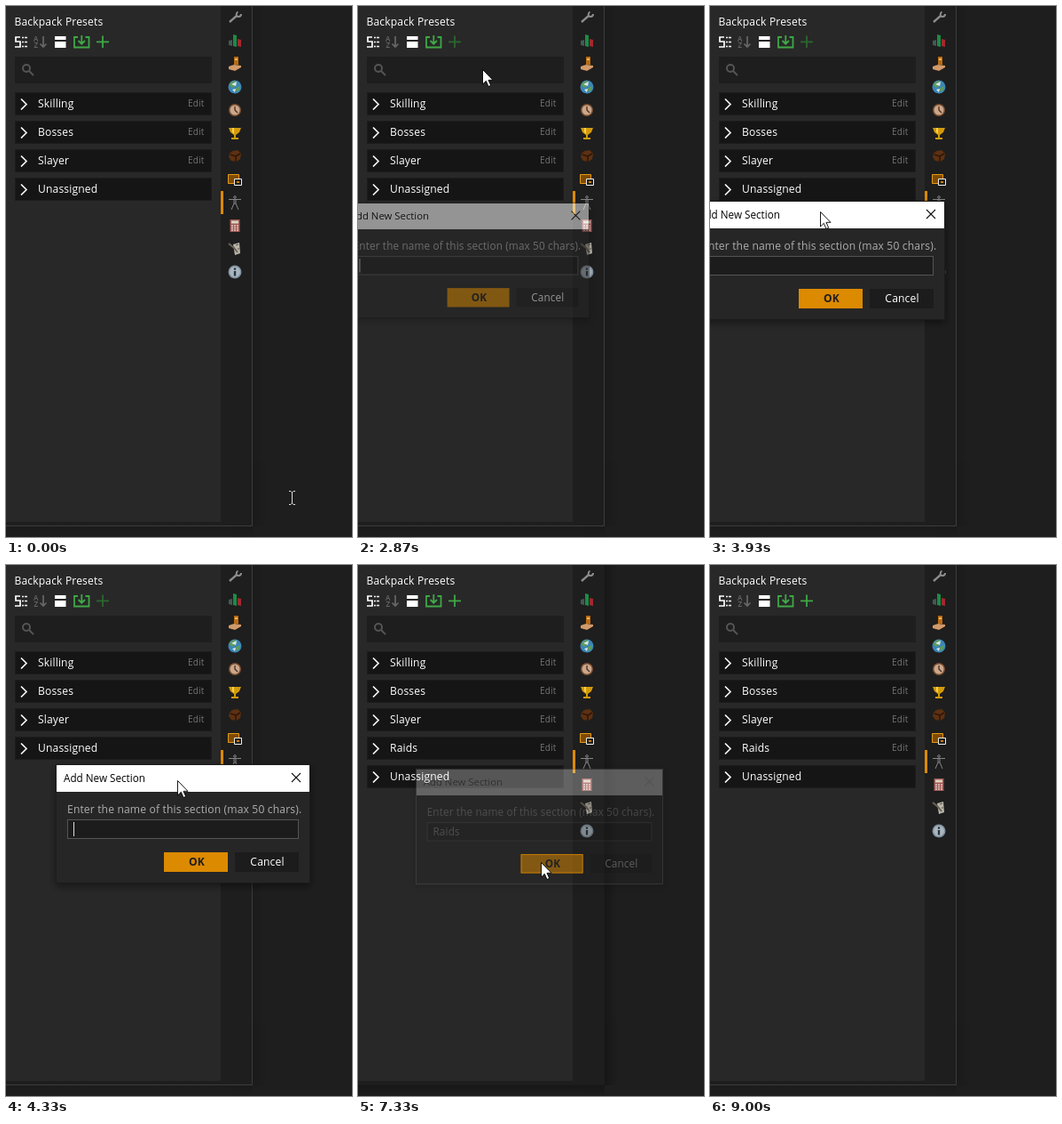
Recreate the animation shown at these times as an HTML page. Size 390 by 597 pixels, loop 9070 ms.

```html
<!DOCTYPE html>
<html lang="en">
<head>
<meta charset="utf-8">
<title>Add a section</title>
<style>
html, body { margin: 0; width: 100%; height: 100%; overflow: hidden; background: #1e1e1e; }
svg { display: block; width: 390px; height: 597px; }
text { font: 12.1px "Open Sans", "Noto Sans", sans-serif; letter-spacing: .15px; fill: #fff; white-space: pre; }
.edit { font-size: 10px; fill: #747474; }
.mid { text-anchor: middle; }
.soft { fill: #adadad; }
.menu { fill: #c8c8c8; font-size: 12px; letter-spacing: 0; }
.title { fill: #000; font-size: 11.7px; letter-spacing: 0; }
.line { fill: none; stroke: #fff; stroke-width: 1.7; }
.az { font-size: 8px; font-weight: 600; fill: #686868; letter-spacing: 0; }
#frame { fill: none; stroke: #1a1a1a; }
#cross { stroke: #111; stroke-width: 1.1; }
.inactive .title { fill: #777; }
.inactive #cross { stroke: #d8d8d8; }
.inactive #frame { stroke: #707070; }
</style>
</head>
<body>
<svg viewBox="0 0 390 597">
  <defs>
    <linearGradient id="side"><stop stop-color="#000" stop-opacity=".3"/><stop offset="1" stop-color="#000" stop-opacity="0"/></linearGradient>
    <linearGradient id="under" x2="0" y2="1"><stop stop-color="#000" stop-opacity=".3"/><stop offset="1" stop-color="#000" stop-opacity="0"/></linearGradient>
    <filter id="drop" x="-10%" y="-15%" width="120%" height="140%"><feDropShadow dx="0" dy="3" stdDeviation="4" flood-opacity=".45"/></filter>
  </defs>
  <rect width="390" height="597" fill="#1e1e1e"/>
  <g id="shade">
    <rect x="278" width="14" height="585" fill="url(#side)"/>
    <rect y="585" width="278" height="12" fill="url(#under)"/>
  </g>
  <rect width="242" height="580" fill="#282828"/>
  <path id="edge" d="M277.5 0V584.5H0" fill="none"/>

  <text x="9.5" y="22">Backpack Presets</text>
  <path class="line" d="M16 35H11V40H16V46H10M18 35.5h2M21 35.5h3M18 40.5h2M21 40.5h3M18 45.5h2M21 45.5h3"/>
  <text class="az" x="31" y="40">A</text><text class="az" x="31.5" y="47">Z</text>
  <path d="M42 34V46M38.5 42.5L42 46L45.5 42.5" fill="none" stroke="#686868" stroke-width="1.7"/>
  <path d="M55 34h12.500v4H55zM55 40h12.500v7H55z" fill="#fff"/>
  <path d="M81 35H77V46.500H93.500V35H89.500M85.300 33V42M81.500 39L85.300 42.700L89 39" fill="none" stroke="#3fa846" stroke-width="1.8"/>
  <path id="plus" d="M109 33.500V47M102 40.300H116" fill="none" stroke-width="1.8"/>
  <rect x="10" y="57" width="222" height="30" fill="#1e1e1e"/>
  <g fill="none" stroke="#555" stroke-width="2"><circle cx="23" cy="70" r="4"/><path d="M26 73L31 78"/></g>
  <g id="rows"></g>

  <rect x="242" y="208" width="3" height="26" fill="#dc8a00"/>
  <g id="icons">
    <g fill="none" stroke="#8e8e8e"><path d="M-6 5L2-2" stroke-width="2.400"/><path d="M3.500-6.500C1-5 1-1 4-1C6-1 7-2 7-4" stroke-width="2"/></g>
    <g><path d="M-7 0l4-1v7l-4-1z" fill="#3f5a55"/><path d="M-2-7l4 1V7l-4-1z" fill="#1f8a44"/><path d="M3-2l4 1V7l-4-1z" fill="#a3282f"/></g>
    <g><path d="M-1-8h5V1h-5z" fill="#b96a14"/><path d="M-7 3L-1 1L7 2V4L0 8L-7 6z" fill="#d39a68"/><path d="M0-5h3" stroke="#f0b84c" stroke-width="2"/></g>
    <g><circle r="7.500" fill="#3a86b8"/><path d="M-5-5L0-7L2-3L-2 1L-6-1zM1 1L6-1L5 4L2 6z" fill="#5f9a5c"/><path d="M-4-3L2-6L1-1zM-3 3L1 2L0 6z" fill="#d9e7e5"/></g>
    <g><circle r="7" fill="#7d5032"/><circle r="5.500" fill="#cba78c"/><path d="M0-4V0L3 3" fill="none" stroke="#4a2c1a" stroke-width="1.300"/></g>
    <g><path d="M-7-6H7L5-1L1 2V5H4V7H-4V5H-1V2L-5-1z" fill="#d39a0c"/><path d="M-3-6V-1L-1 1V-6z" fill="#f7d34d"/></g>
    <g><path d="M-6-3L-3-6L3-7L7-3L6 3L2 6L-4 5L-7 1z" fill="#5d3011"/><path d="M-5-2L1 0L6-3M1 0V6" fill="none" stroke="#2c1609" stroke-width="1.500"/></g>
    <g><path d="M-7.500-5.500H4.500V4.500H-7.500z" fill="#7d4b00" stroke="#e59a13"/><path d="M-.5-.5H7.500V6.500H-.5z" fill="#1e1e1e" stroke="#eee"/><path d="M2 2H5V4H2z" fill="#c98310"/></g>
    <g fill="none" stroke="#858585"><circle cy="-6" r="1.300"/><path d="M-7-3.500H7M-1-4V1M1-4V1M-4 8L-1 1H1L4 8"/></g>
    <g><path d="M-5.500-7h11V7h-11z" fill="#a05a55"/><path d="M-4-5.500h8v3h-8z" fill="#ddd6c4"/><path d="M-4 0h8M-4 2.500h8M-4 5h8" stroke="#e6c9c4" stroke-width="1.500" stroke-dasharray="2 1"/></g>
    <g><path d="M-2-5L5-7L6 5L0 7z" fill="#b9b5a9"/><path d="M-7-6L-1-1L3 4" fill="none" stroke="#6b6154" stroke-width="2"/><path d="M1-4L4-5M3 0L5 0" stroke="#595650"/></g>
    <g><circle r="7.500" fill="#7f8d99"/><circle r="6" fill="#a9b6c0"/><path d="M0-4.500V-2.300M0-1V4.500" stroke="#26323c" stroke-width="2.300"/></g>
  </g>

  <g id="menu">
    <rect x="114.500" y="40.500" width="124" height="51" fill="#383838" stroke="#5c5c5c"/>
    <rect id="glow" x="116" width="121" height="22" fill="#484848"/>
    <text class="menu" x="121" y="59">Add new setup..</text>
    <text class="menu" x="121" y="81">Add new section..</text>
  </g>

  <g id="dialog">
    <g id="face" filter="url(#drop)">
      <rect width="285" height="132" fill="#282828"/>
      <rect width="285" height="30" fill="#fff"/>
      <rect id="frame" x="-.5" y="-.5" width="286" height="133"/>
      <text class="title" x="8" y="19">Add New Section</text>
      <path id="cross" d="M265 9L275 19M275 9L265 19"/>
      <text class="soft" x="12" y="54">Enter the name of this section (max 50 chars).</text>
      <rect x="12.500" y="61.500" width="260" height="21" fill="#1e1e1e" stroke="#545454"/>
      <text id="name" x="19" y="76" class="soft"></text>
      <path id="caret" d="M0 64V80" stroke="#ddd"/>
      <rect x="201" y="98" width="72" height="22" fill="#1e1e1e"/>
      <text class="mid" x="237.500" y="113">Cancel</text>
    </g>
    <g id="ok">
      <rect x="121" y="98" width="72" height="22" fill="#dc8a00"/>
      <text class="mid" x="158" y="113" style="fill:#1e1e1e;font-weight:700">OK</text>
    </g>
    <rect id="press" x="121.500" y="98.500" width="71" height="21" fill="none" stroke="#c67c06"/>
  </g>

  <g id="beam" fill="none" stroke="#ddd"><path d="M-3-7.500H-1L.5-6L2-7.500H4M.5-6V6M-3 7.500H-1L.5 6L2 7.500H4"/></g>
  <path id="arrow" d="M.5.5V17L4.300 13.300L7 19.500L9.700 18.300L7 12.300H12z" fill="#fff" stroke="#000" stroke-width=".9"/>
</svg>
<script>
const LOOP = 9070, TICK = 1000 / 15;
const $ = id => document.getElementById(id);
const show = (el, on) => el.setAttribute("visibility", on ? "visible" : "hidden");
const place = (el, x, y) => el.setAttribute("transform", `translate(${x} ${y})`);
const within = (t, a, b) => t >= a && t < b;

// start, end, from, control point, to
const cursorMoves = [
  [0, 930, 322, 553, 215, 210, 114, 44],
  [1000, 1130, 114, 44, 114, 42, 114, 40],
  [1670, 2070, 114, 40, 128, 52, 140, 71],
  [2870, 3730, 140, 71, 140, 180, 111, 235],
  [3785, 4370, 111, 235, 152, 217, 194, 243],
  [6040, 6670, 194, 243, 206, 194, 206, 334],
  [7670, 8130, 206, 334, 150, 235, 62, 221],
  [8130, 8600, 62, 221, 15, 260, 52, 564],
  [8600, 8730, 52, 564, 54, 580, 56, 600]
];
const dialogMoves = [[3930, 4400, -21, 220, 20, 199, 62, 228]];

// time, opacity, scale, button opacity
const fades = [
  [0, 0, 1, 0], [2870, .5, .972, .5], [2930, .85, .99, .85], [3000, 1, 1, 1],
  [7130, 1, 1, .85], [7270, .6, .985, .7], [7330, .28, .972, .5],
  [7400, .1, .96, .2], [7470, 0, 1, 0]
];
const typed = [[0, "", 19.5], [5070, "R", 27], [5270, "Ra", 34], [5530, "Rai", 37.5], [5600, "Raid", 44.5], [5670, "Raids", 50.5]];
const last = (list, t) => list.filter(s => s[0] <= t).pop() || list[0];

function pos(moves, t) {
  const [a, b, x0, y0, cx, cy, x1, y1] = last(moves, t);
  const u = Math.min(1, Math.max(0, (t - a) / (b - a)));
  const s = u * u * (3 - 2 * u), r = 1 - s;
  const mix = (p, c, q) => Math.round(r * r * p + 2 * r * s * c + s * s * q);
  return [mix(x0, cx, x1), mix(y0, cy, y1)];
}

function drawRows(names) {
  $("rows").innerHTML = names.map((name, i) => {
    const edit = name === "Unassigned" ? "" : '<text class="edit" x="205" y="16">Edit</text>';
    return `<g transform="translate(0 ${97 + 32 * i})">
      <rect x="10.5" y=".5" width="221" height="25" fill="#151515" stroke="#1c1c1c"/>
      <path class="line" d="M17 7.5L23 13.5L17 19.5"/><text x="36" y="17">${name}</text>${edit}</g>`;
  }).join("");
}

[...$("icons").children].forEach((icon, i) => place(icon, 258, 13 + 26 * i));

let rowCount = 0;
function draw(t) {
  const closing = t >= 7270;
  const names = ["Skilling", "Bosses", "Slayer", ...(closing ? ["Raids"] : []), "Unassigned"];
  if (names.length !== rowCount) {
    rowCount = names.length;
    drawRows(names);
  }

  const focused = within(t, 930, 2870) || within(t, 7270, 9000);
  $("edge").setAttribute("stroke", focused ? "#1c1c1c" : "#3c3c3c");
  $("shade").setAttribute("opacity", focused ? .8 : .35);
  const dim = within(t, 930, 1330) || within(t, 1400, 7270);
  $("plus").setAttribute("stroke", dim ? "#2b672f" : "#3fa846");

  const [x, y] = pos(cursorMoves, t);
  const menuOn = within(t, 1330, 2870);
  show($("menu"), menuOn);
  show($("glow"), menuOn && y > 42);
  $("glow").setAttribute("y", y < 66 ? 44 : 67);

  const [, alpha, scale, okAlpha] = last(fades, t);
  const [dx, dy] = pos(dialogMoves, t);
  const open = alpha > 0;
  show($("dialog"), open);
  show($("press"), open && within(t, 7130, 7400));
  $("dialog").setAttribute("class", closing ? "inactive" : "");
  $("dialog").setAttribute("transform",
    `translate(${dx + 142.5 * (1 - scale)} ${dy + 66 * (1 - scale)}) scale(${scale})`);
  $("face").setAttribute("opacity", alpha);
  $("ok").setAttribute("opacity", okAlpha);

  const [typedAt, text, caretX] = last(typed, t);
  $("name").textContent = text;
  place($("caret"), caretX, 0);
  const blinkFrom = typedAt || 2870;
  $("caret").setAttribute("opacity", Math.floor((t - blinkFrom) / 500) % 2 ? 0 : 1);

  const overText = x >= 278;
  place($("beam"), x, y);
  place($("arrow"), x, y);
  show($("beam"), overText);
  show($("arrow"), !overText);
}

const start = performance.now();
function frame(now) {
  const t = Math.max(0, now - start) % LOOP;
  const k = Math.floor((t + 4) / TICK);
  draw(Math.round(k * TICK / 10) * 10);
  requestAnimationFrame(frame);
}
draw(0);
requestAnimationFrame(frame);
</script>
</body>
</html>
```
